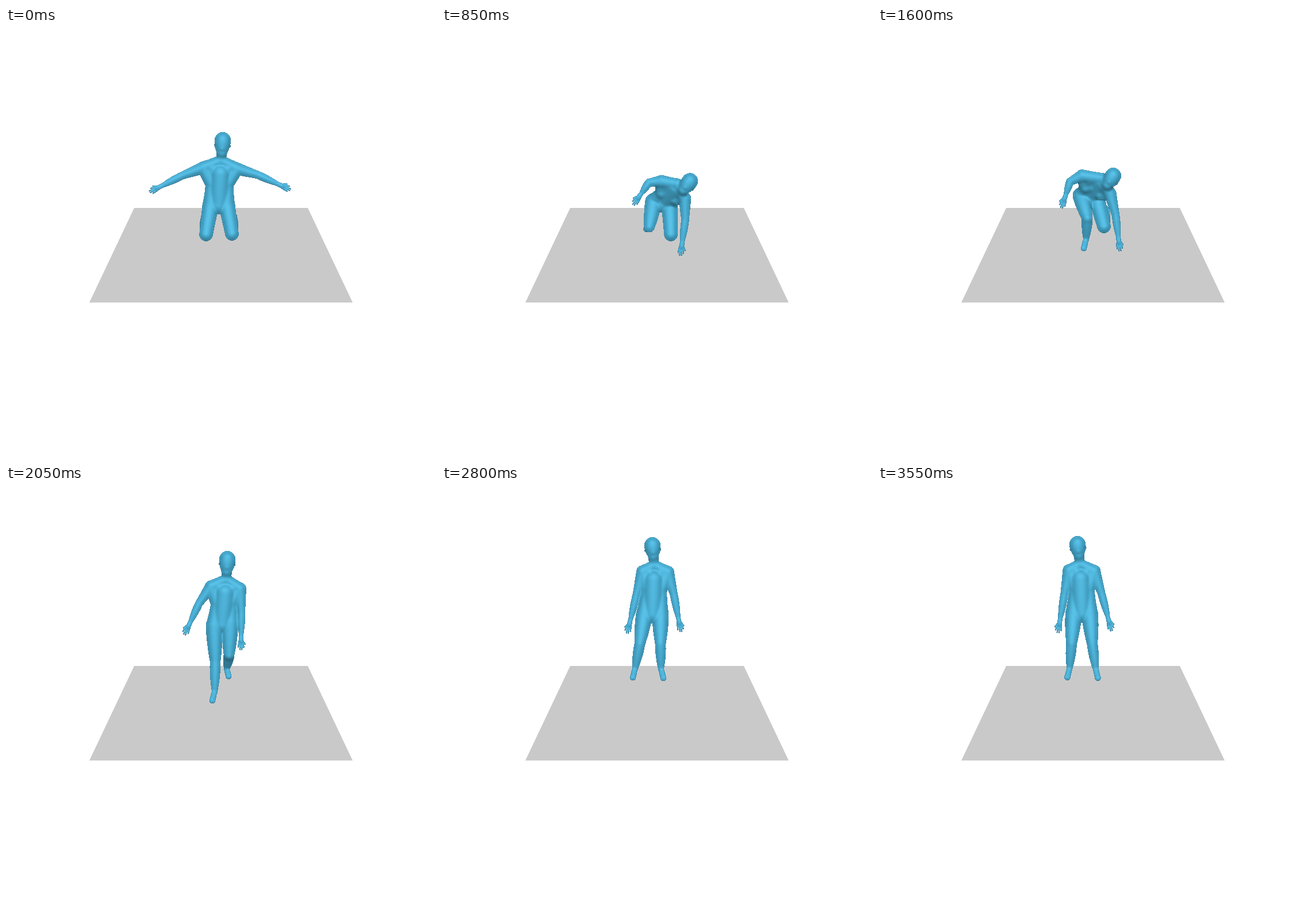
An HTML page with a canvas that plays this animation: 748 px wide and 748 px high, repeating every 3.6 s.

```html
<!DOCTYPE html>
<html lang="en">
<head>
<meta charset="utf-8">
<title>Rising figure</title>
<style>
html, body { margin: 0; width: 100%; height: 100%; overflow: hidden; background: #fff; }
canvas { display: block; }
</style>
</head>
<body>
<canvas id="stage" width="748" height="748"></canvas>
<script>
const ctx = document.getElementById('stage').getContext('2d', { willReadFrequently: true });
const LOOP = 3600, STEP = 50;
const X0 = 236, Y0 = 76, W = 276, H = 328; // part of the stage the figure can reach
const EMPTY = -1e4;

const clamp = (v, lo, hi) => Math.max(lo, Math.min(hi, v));
const mix = (a, b, t) => a.map((v, i) => v + (b[i] - v) * t);
const shift = (p, x, y, z = 0) => [p[0] + x, p[1] + y, p[2] + z];
const distance = (a, b) => Math.hypot(b[0] - a[0], b[1] - a[1]);
const missing = (length, a, b) => Math.sqrt(Math.max(0, length ** 2 - distance(a, b) ** 2));

// Key points only; elbows, hips, hands, feet and all depths follow from them.
// "A" is the side on the left of the picture. arm: shoulder, wrist. leg: knee, ankle.
const kneeling = (side, x, y) => [[x, y], [x + side * 6, y - 21]];
const kneel = {
  spine: [[377, 195], [374, 231], [370, 308]],
  armA: [[343, 243], [272, 274]], armB: [[402, 245], [472, 271]],
  legA: kneeling(-1, 348, 359), legB: kneeling(1, 393, 358)
};
const reach = {
  spine: [[431, 245], [407, 258], [378, 308]],
  armA: [[373, 257], [333, 291]], armB: [[420, 284], [422, 360]],
  legA: kneeling(-1, 352, 355), legB: kneeling(1, 397, 359)
};
const crouch = {
  spine: [[421, 281], [404, 281], [383, 300]],
  armA: [[384, 274], [351, 281]], armB: [[420, 304], [421, 369]],
  legA: [[370, 335], [366, 367]], legB: kneeling(1, 398, 357)
};
const push = {
  spine: [[409, 257], [390, 262], [367, 295]],
  armA: [[355, 257], [327, 289]], armB: [[404, 289], [418, 363]],
  legA: [[364, 331], [362, 367]], legB: kneeling(1, 393, 345)
};
const stride = {
  spine: [[385, 127], [383, 163], [376, 240]],
  armA: [[357, 175], [321, 236]], armB: [[407, 179], [409, 260]],
  legA: [[364, 305], [363, 357]], legB: [[388, 294], [384, 318]]
};
const stand = {
  spine: [[366, 103], [369, 138], [366, 223]],
  armA: [[349, 149], [328, 232]], armB: [[393, 150], [411, 229]],
  legA: [[344, 275], [336, 317]], legB: [[380, 275], [381, 318]]
};
// Weight moves to one side: the higher a point, the further it sways
const sway = ([x, y]) => {
  const up = clamp((330 - y) / 215, 0, 1) ** .7;
  return [x - 19 * up, y - 2 * up];
};
const swayed = Object.fromEntries(Object.entries(stand).map(([part, points]) => [part, points.map(sway)]));

const poses = [kneel, reach, crouch, push, stride, stand, swayed];
const times = [0, 550, 1200, 1600, 2050, 2800, 3550];

// Cubic Hermite through the poses, with slopes taken from the neighbours
function pointsAt(t) {
  const last = poses.length - 1;
  let i = 0;
  while (i < last - 1 && t >= times[i + 1]) i++;
  const before = Math.max(i - 1, 0), after = Math.min(i + 2, last);
  const span = times[i + 1] - times[i], u = (t - times[i]) / span, v = 1 - u;
  const blend = (part, j, axis) => {
    const get = n => poses[n][part][j][axis];
    const slope = (a, b) => (get(b) - get(a)) / (times[b] - times[a]) * span;
    return (1 + 2 * u) * v * v * get(i) + u * v * v * slope(before, i + 1)
      + u * u * (3 - 2 * u) * get(i + 1) - u * u * v * slope(i, after);
  };
  return Object.fromEntries(Object.keys(kneel).map(part =>
    [part, kneel[part].map((_, j) => [blend(part, j, 0), blend(part, j, 1), 0])]));
}

const height = new Float32Array(W * H), softer = new Float32Array(W * H);

// Adds a rounded bone to the height field; its radius runs ra, rm, rb along the length
function bone(a, b, ra, rm, rb) {
  const ax = a[0] - X0, ay = a[1] - Y0, dx = b[0] - a[0], dy = b[1] - a[1];
  const len2 = dx * dx + dy * dy || 1e-6, r = Math.max(ra, rm, rb) + 1;
  const left = Math.max(1, Math.floor(Math.min(ax, ax + dx) - r));
  const right = Math.min(W - 2, Math.ceil(Math.max(ax, ax + dx) + r));
  const top = Math.max(1, Math.floor(Math.min(ay, ay + dy) - r));
  const bottom = Math.min(H - 2, Math.ceil(Math.max(ay, ay + dy) + r));
  const bend = 2 * rm - (ra + rb) / 2;
  for (let y = top; y <= bottom; y++) {
    for (let x = left; x <= right; x++) {
      const px = x + .5 - ax, py = y + .5 - ay;
      const t = clamp((px * dx + py * dy) / len2, 0, 1), s = 1 - t;
      const rad = ra * s * s + 2 * bend * s * t + rb * t * t;
      const inside = rad * rad - (px - dx * t) ** 2 - (py - dy * t) ** 2;
      if (inside <= 0) continue;
      const k = y * W + x;
      height[k] = Math.max(height[k], a[2] + (b[2] - a[2]) * t + Math.sqrt(inside));
    }
  }
}

function drawHead(crown, neck, lean) {
  const chin = shift(mix(crown, neck, .52), 0, lean * .3, 4);
  bone(mix(chin, neck, .3), shift(neck, 0, 2, -3), 9, 9, 11);
  bone(crown, chin, 14, 13.3, 9.5);
  const dx = chin[0] - crown[0], dy = chin[1] - crown[1], len = Math.hypot(dx, dy) || 1;
  for (const side of [-12.5, 12.5]) {
    const ear = shift(mix(crown, chin, .45), -dy / len * side, dx / len * side, -2);
    bone(ear, mix(ear, chin, .2), 2.2, 2.2, 2);
  }
  bone(shift(mix(crown, chin, .45), 0, 0, 11), shift(mix(crown, chin, .75), 0, 0, 11), 2, 2.4, 2.8);
}

function drawTorso(neck, pelvis, shoulders, hips) {
  const chest = mix(neck, pelvis, .3);
  bone(chest, pelvis, 18, 17.5, 16);
  shoulders.forEach((shoulder, i) => {
    const top = mix(shoulder, shoulders[1 - i], .26), rib = mix(top, hips[i], .42);
    bone(neck, shoulder, 10, 10, 11);
    bone(shoulder, rib, 11, 11, 11);
    bone(top, hips[i], 11, 10.5, 14.5);
    bone(rib, mix(rib, chest, .4), 11, 11, 12);
  });
}

function drawArm(shoulder, wrist, side) {
  const reach = distance(shoulder, wrist) || 1;
  const bow = side * clamp(88 - reach, 0, 60) * .2 / reach;
  const elbow = shift(mix(shoulder, wrist, .5),
    (wrist[1] - shoulder[1]) * bow, (shoulder[0] - wrist[0]) * bow);
  bone(shoulder, elbow, 11, 8.8, 6.8);
  bone(elbow, wrist, 6.8, 6.3, 3.8);
  const len = distance(elbow, wrist) || 1;
  const ux = (wrist[0] - elbow[0]) / len, uy = (wrist[1] - elbow[1]) / len;
  const hand = (along, across) => shift(wrist, ux * along - uy * across, uy * along + ux * across);
  bone(wrist, hand(10, 0), 3.8, 4.2, 4.2);
  for (const finger of [-1.5, -.5, .5, 1.5]) {
    bone(hand(10, finger * 2), hand(25 - finger * finger * 2, finger * 3.2), 1.7, 1.5, 1.1);
  }
  bone(hand(6, 0), hand(15, -side * 6.5), 2.2, 2, 1.3);
}

function drawLeg(hip, knee, ankle, side) {
  const folded = clamp((knee[1] - ankle[1]) / 20, 0, 1);
  const kneeSize = 9.3 + 2.5 * folded;
  const turn = clamp((ankle[1] - knee[1]) / 30, -.6, 1);
  bone(hip, knee, 14.5, 13, kneeSize);
  bone(knee, ankle, kneeSize, 8.5, 5);
  bone(ankle, shift(ankle, side * 4 * turn, 16 * turn, 10 * turn), 5, 5, 5.3);
}

function drawBody({ spine: [crown, neck, pelvis], armA, armB, legA, legB }) {
  // A shortened spine means the body leans towards the viewer
  const lean = missing(78, neck, pelvis) * .65;
  neck[2] = lean;
  crown[2] = lean + 8;
  for (const point of [...armA, ...armB]) point[2] = lean * .85;
  const tilt = (legA[0][1] - legB[0][1]) * .25;
  const hips = [shift(pelvis, -14, tilt), shift(pelvis, 14, -tilt)];
  [legA, legB].forEach(([knee, ankle], i) => {
    knee[2] = missing(56, hips[i], knee) * .7;
    ankle[2] = knee[2] - missing(44, knee, ankle) * .8;
    drawLeg(hips[i], knee, ankle, i ? 1 : -1);
  });
  drawTorso(neck, pelvis, [armA[0], armB[0]], hips);
  drawArm(...armA, -1);
  drawArm(...armB, 1);
  drawHead(crown, neck, lean);
}

// Smooths creases without leaking over outlines
function soften(src, dst) {
  for (let k = W; k < W * (H - 1); k++) {
    const h = src[k];
    if (h === EMPTY) continue;
    let sum = h * 2;
    for (const o of [-1, 1, -W, W]) sum += Math.abs(src[k + o] - h) < 7 ? src[k + o] : h;
    dst[k] = sum / 6;
  }
}

function shade() {
  const image = ctx.getImageData(X0, Y0, W, H), px = image.data;
  for (let k = W; k < W * (H - 1); k++) {
    const h = height[k];
    if (h === EMPTY) continue;
    const at = o => clamp(height[k + o], h - 3, h + 3);
    const nx = (at(-1) - at(1)) / 2, ny = (at(-W) - at(W)) / 2;
    const light = clamp((.96 - .28 * ny) / Math.sqrt(nx * nx + ny * ny + 1), 0, 1);
    const level = .52 + .48 * light, gloss = 16 * light ** 10;
    [74, 178, 217].forEach((c, i) => px[k * 4 + i] = c * level + gloss);
  }
  ctx.putImageData(image, X0, Y0);
}

function drawFloor() {
  ctx.fillStyle = '#fff';
  ctx.fillRect(0, 0, 748, 748);
  ctx.fillStyle = '#c9c9c9';
  ctx.fill(new Path2D('M223 313H525L603 477.5H145Z'));
}

function draw(t) {
  height.fill(EMPTY);
  softer.fill(EMPTY);
  drawBody(pointsAt(t));
  for (let i = 0; i < 5; i++) {
    soften(height, softer);
    soften(softer, height);
  }
  drawFloor();
  shade();
}

const start = performance.now();
let shown = -1;
function tick() {
  const t = Math.floor((performance.now() - start) % LOOP / STEP) * STEP;
  if (t !== shown) draw(shown = t);
  requestAnimationFrame(tick);
}
tick();
</script>
</body>
</html>
```
